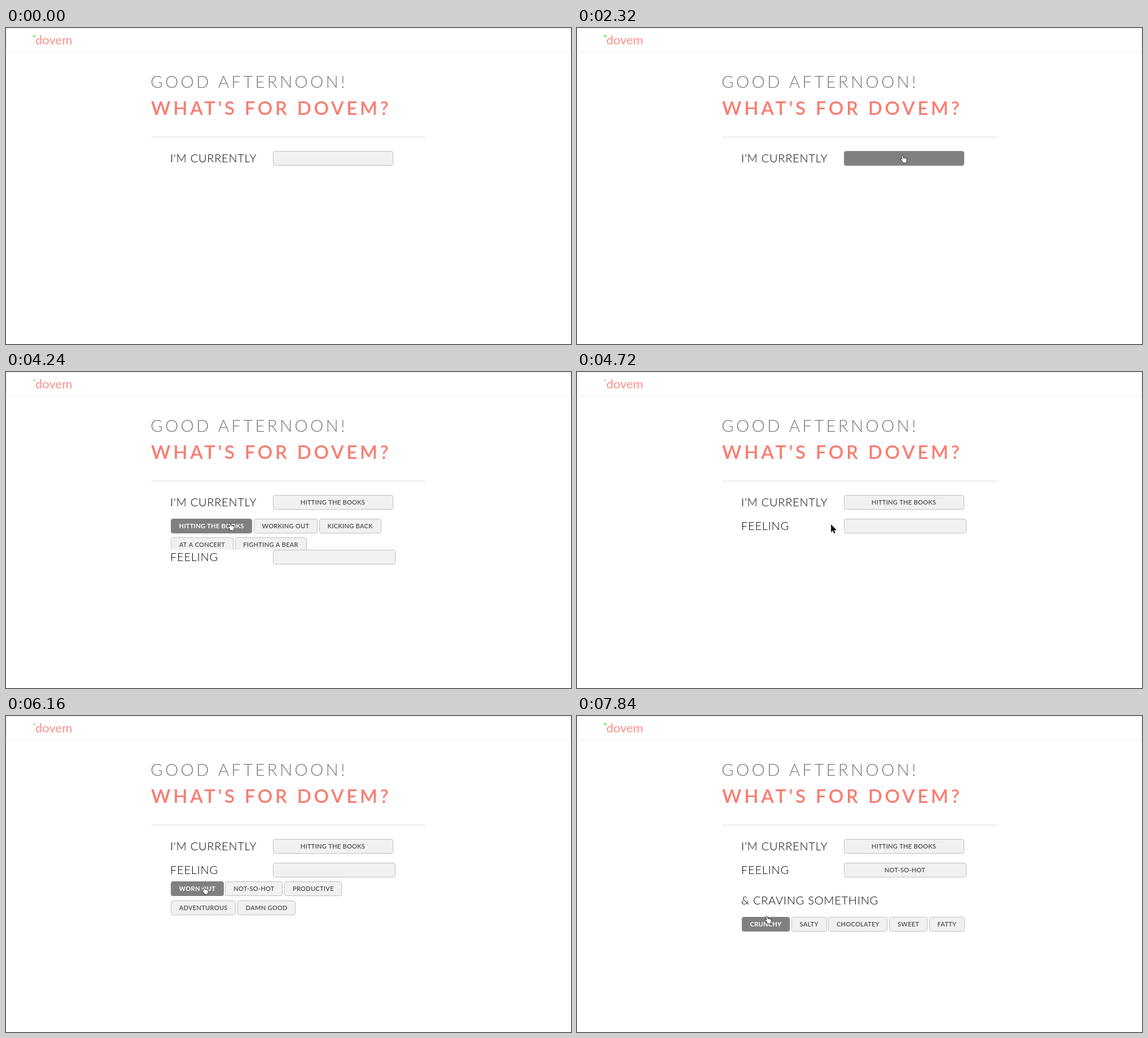
An HTML page with a canvas for the animation above (8000 ms loop, 1001x560 px).

```html
<!DOCTYPE html>
<html lang="en">
<head>
<meta charset="utf-8">
<title>Food mood picker</title>
<style>
html, body { margin: 0; width: 100%; height: 100%; overflow: hidden; background: #fff; }
canvas { display: block; }
</style>
</head>
<body>
<canvas width="1001" height="560"></canvas>
<script>
const ctx = document.querySelector('canvas').getContext('2d');
const LOOP = 8000, STEP = 80;
const LEFT = 292, RIGHT = 700, FIELD = 472.5;
const ROW = 33.5, BUTTON = 26, GAP = 2.7, PADDING = 29.5;
const BORDER = '#bfbfbf', FOCUS = '#888', HOVER = '#808080';

const activities = ['HITTING THE BOOKS', 'WORKING OUT', 'KICKING BACK', 'AT A CONCERT', 'FIGHTING A BEAR'];
const moods = ['WORN OUT', 'NOT-SO-HOT', 'PRODUCTIVE', 'ADVENTUROUS', 'DAMN GOOD'];
const cravings = ['CRUNCHY', 'SALTY', 'CHOCOLATEY', 'SWEET', 'FATTY'];

// Pointer moves: start, end, then the x and y reached; it rests in between
const moves = [
  [480, 480, 560, 4], [480, 840, 400, 220], [840, 1200, 316, 113], [2320, 2320, 578, 232],
  [2800, 3440, 443, 280], [3600, 3760, 398, 274], [4400, 4880, 482, 280], [5520, 6160, 352, 309],
  [6400, 6560, 441, 319], [7040, 7600, 350, 372], [7680, 7840, 338, 361]
];

const hand = new Path2D('M-3-5q1-1.5 2 0l1 4 1-.6 1 .6 1-.4 1 .8 1-.2q1 .6 .9 2l-.6 3v2.3h-5.5l-.5-1.5-3.4-4.5q.2-1.3 1.6-.6l1.4 1z');
const arrow = new Path2D('M-4-8v14l3.2-3 2.2 5 2.2-1-2.2-4.8h4.6z');

let pointer, hovering;

function progress(t, start, end) {
  return t >= end ? 1 : Math.max(0, (t - start) / (end - start));
}

function swing(t, start) {
  return (1 - Math.cos(progress(t, start, start + 400) * Math.PI)) / 2;
}

function pointerAt(t) {
  if (t < moves[0][0]) return null;
  let x = 0, y = 0;
  for (const [start, end, toX, toY] of moves) {
    const k = progress(t, start, end);
    x += (toX - x) * k;
    y += (toY - y) * k;
  }
  return { x, y };
}

function setFont(size, weight, spacing) {
  ctx.font = `${weight} ${size}px Lato, Inter, sans-serif`;
  ctx.letterSpacing = spacing + 'px';
}

function text(str, x, y, size, weight, spacing, color, align = 'left') {
  setFont(size, weight, spacing);
  ctx.textAlign = align;
  ctx.fillStyle = color;
  ctx.fillText(str, x, y);
}

function label(str, y) {
  text(str, LEFT - 1, y, 20, 300, .75, '#000');
}

function button(str, x, y, w, border = BORDER, limit = Infinity) {
  const tipX = pointer ? pointer.x - 2 : -1, tipY = pointer ? pointer.y - 5 : -1;
  const over = tipX >= x && tipX <= x + w && tipY >= y && tipY <= Math.min(y + BUTTON, limit);
  hovering ||= over;
  ctx.beginPath();
  ctx.roundRect(Math.round(x) + .5, Math.round(y) + .5, Math.round(w) - 1, BUTTON - 1, 3);
  ctx.fillStyle = over ? HOVER : '#f1f1f1';
  ctx.fill();
  ctx.strokeStyle = over ? HOVER : border;
  ctx.lineWidth = 1;
  ctx.stroke();
  text(str, x + w / 2, y + 17.3, 11, over ? 700 : 600, .3, over ? '#fff' : '#4a4a4a', 'center');
}

// Buttons flow from left to right and wrap; only the given height shows
function list(options, top, height) {
  if (height <= 0) return;
  ctx.save();
  ctx.beginPath();
  ctx.rect(0, top, 1001, height);
  ctx.clip();
  let x = LEFT, y = top;
  for (const str of options) {
    setFont(11, 600, .3);
    const w = ctx.measureText(str).width + PADDING;
    if (x + w > RIGHT) {
      x = LEFT;
      y += ROW;
    }
    button(str, x, y, w, BORDER, top + height);
    x += w + GAP;
  }
  ctx.restore();
}

function header(t) {
  ctx.strokeStyle = '#ededed';
  ctx.lineWidth = 1;
  ctx.strokeRect(.5, .5, 1000, 42);
  ctx.beginPath();
  ctx.arc(50, 14.5, 2.4, 0, 7);
  ctx.fillStyle = t >= 2800 && t < 6800 ? '#dcdfdc' : '#86f08c';
  ctx.fill();
  text('dovem', 52, 29, 22, 400, 0, '#fa918a');
  text('GOOD AFTERNOON!', 256, 106, 29.5, 300, 4.2, '#777');
  text("WHAT'S FOR DOVEM?", 257, 153.5, 33, 600, 4.7, '#fb7b6f');
  ctx.fillStyle = '#e6e6e6';
  ctx.fillRect(257, 192.5, 487, 1.3);
}

function drawPointer() {
  const shape = hovering ? hand : arrow;
  ctx.save();
  ctx.translate(pointer.x, pointer.y);
  ctx.lineJoin = 'round';
  ctx.lineWidth = 1.6;
  ctx.strokeStyle = hovering ? '#222' : '#fff';
  ctx.fillStyle = hovering ? '#fff' : '#111';
  ctx.stroke(shape);
  ctx.fill(shape);
  ctx.restore();
}

function draw(t) {
  ctx.clearRect(0, 0, 1001, 560);
  pointer = pointerAt(t);
  hovering = false;
  header(t);

  const picked = t >= 4080, rated = t >= 6800;
  label("I'M CURRENTLY", 238);
  button(picked ? activities[0] : '', FIELD, 217.5, 213, t >= 2800 && !picked ? FOCUS : BORDER);

  const activityHeight = 2 * ROW * (swing(t, 2800) - swing(t, 4131));
  list(activities, 259.5, activityHeight);
  if (picked) {
    label('FEELING', 280 + activityHeight);
    button(rated ? moods[1] : '', FIELD, 259.5 + activityHeight, 217);
  }

  const moodHeight = 2 * ROW * (swing(t, 4960) - swing(t, 6866));
  list(moods, 293, moodHeight);
  if (rated) {
    label('& CRAVING SOMETHING', 334 + moodHeight);
    list(cravings, 355.5 + moodHeight, ROW);
  }

  if (pointer) drawPointer();
}

const begin = performance.now();
function tick() {
  const t = (performance.now() - begin) % LOOP;
  draw(Math.floor(t / STEP) * STEP);
  requestAnimationFrame(tick);
}
tick();
</script>
</body>
</html>
```
